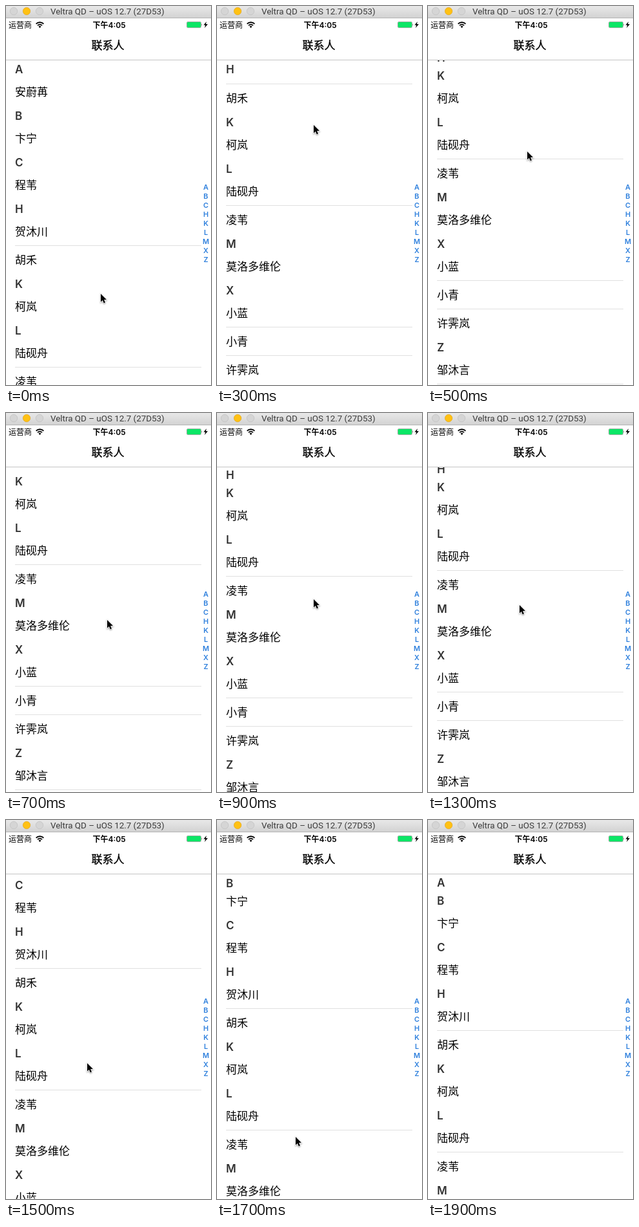
Recreate the animation shown at these times as an HTML page. Size 318 px wide and 586 px high, loop 2000 ms.

```html
<!DOCTYPE html>
<html lang="zh-CN">
<head>
<meta charset="utf-8">
<title>联系人</title>
<style>
  html, body { margin: 0; width: 100%; height: 100%; overflow: hidden; background: #fff; }
  svg { display: block; font-family: Inter, "Noto Sans CJK SC", "Noto Sans CJK", sans-serif; }
  .window { font: 13.4px Roboto, sans-serif; fill: #3c3c3c; }
  .status { font-size: 12px; }
  .title { font-size: 17px; font-weight: 500; text-anchor: middle; }
  .name { font: 17px "Noto Sans CJK SC", "Noto Sans CJK", sans-serif; }
  .letter { font-size: 17px; font-weight: 600; fill: #333; }
  .index { font-size: 11px; font-weight: 600; fill: #2f80dd; text-anchor: middle; }
  #cursor { filter: drop-shadow(0 1px 1px #0006); }
</style>
</head>
<body>
<svg width="318" height="586" viewBox="0 0 318 586">
  <defs>
    <linearGradient id="chrome" x2="0" y2="1">
      <stop stop-color="#e8e8e8"/><stop offset="1" stop-color="#d3d3d3"/>
    </linearGradient>
    <clipPath id="viewport"><rect y="84" width="318" height="502"/></clipPath>
  </defs>
  <rect width="318" height="586" fill="#fff"/>

  <g clip-path="url(#viewport)">
    <g id="rows"></g>
    <g id="headers"></g>
  </g>
  <g id="index"></g>

  <rect y="83" width="318" height="1" fill="#c4c4c4"/>
  <text class="title" x="158" y="67" stroke="#000" stroke-width=".35">联系人</text>

  <text class="status" x="4" y="34">运营商</text>
  <g fill="none" stroke="#000" stroke-width="1.8">
    <path d="M46.6 27.7a8.3 8.3 0 0 1 11.8 0M49 30.2a5 5 0 0 1 7 0"/>
    <path d="M52.5 34l-2-2.2a2.9 2.9 0 0 1 4 0z" fill="#000" stroke="none"/>
  </g>
  <text class="status" x="160" y="34" text-anchor="middle" font-weight="600">下午4:05</text>
  <rect x="280.5" y="24.5" width="22" height="9" rx="1.5" fill="#fff" stroke="#6a8f78" stroke-width=".7"/>
  <rect x="281" y="25" width="21" height="8" rx="1" fill="#0ce666"/>
  <path d="M303.5 27.3q1.6 1.7 0 3.4z" fill="#444"/>
  <path d="M311 24l-4.5 5.6h2.8l-1.3 4.4 5-6h-3z"/>

  <rect width="318" height="18" fill="url(#chrome)"/>
  <rect y="18" width="318" height="1" fill="#b4b4b4"/>
  <g stroke-width=".7">
    <circle cx="12" cy="8" r="5.7" fill="#d5d5d5" stroke="#bfbfbf"/>
    <circle cx="32" cy="8" r="5.7" fill="#ffc114" stroke="#e3a51f"/>
    <circle cx="52" cy="8" r="5.7" fill="#d5d5d5" stroke="#bfbfbf"/>
  </g>
  <text class="window" x="69" y="13">Veltra QD – uOS 12.7 (27D53)</text>

  <path id="cursor" d="M0 0V12.6L2.9 9.9 4.8 14.4 6.9 13.5 5.1 9.1H9Z"
        stroke="#fff" stroke-width="1.4" paint-order="stroke"/>
</svg>
<script>
const LOOP = 2000, STEP = 100;
const TOP = 83, HEADER = 28, ROW = 44;

const contacts = {
  A: ["安蔚苒"], B: ["卞宁"], C: ["程苇"], H: ["贺沐川", "胡禾"], K: ["柯岚"],
  L: ["陆砚舟", "凌苇"], M: ["莫洛多维伦"], X: ["小蓝", "小青", "许霁岚"], Z: ["邹沐言"]
};

// time, scroll offset, cursor x, cursor y
const keys = [
  [0, 0, 147, 445], [100, 70, 148, 372], [300, 250, 150, 184],
  [400, 300, 152, 190], [500, 322, 154, 225], [700, 324, 157, 320],
  [900, 306, 150, 288], [1100, 277, 143, 257], [1300, 315, 142, 297],
  [1400, 230, 135, 335], [1500, 141, 126, 376], [1600, 105, 124, 430],
  [1700, 79, 122, 490], [1800, 59, 120, 550], [1900, 45, 118, 610]
];

const byId = id => document.getElementById(id);

function add(parent, tag, attributes, text = "") {
  const node = document.createElementNS("http://www.w3.org/2000/svg", tag);
  for (const key in attributes) node.setAttribute(key, attributes[key]);
  node.textContent = text;
  parent.append(node);
  return node;
}

const move = (node, x, y) => node.setAttribute("transform", `translate(${x} ${y})`);

let y = 0;
const sections = Object.entries(contacts).map(([letter, names], i) => {
  const top = y;
  y += HEADER;
  names.forEach((name, n) => {
    add(byId("rows"), "text", { class: "name", x: 14, y: y + 28 }, name);
    y += ROW;
    if (n < names.length - 1 || letter === "Z")
      add(byId("rows"), "rect", { x: 14, y: y - 1, width: 289, height: 1, fill: "#e0e0e0" });
  });
  const header = add(byId("headers"), "g", {});
  add(header, "rect", { width: 304, height: HEADER, fill: "#fff" });
  add(header, "text", { class: "letter", x: 14, y: 21 }, letter);
  add(byId("index"), "text", { class: "index", x: 310, y: 284 + 14 * i }, letter);
  return { header, top, bottom: y };
});

function sample(time) {
  const next = keys.findIndex(key => key[0] > time);
  if (next < 0) return keys[keys.length - 1];
  const a = keys[next - 1], b = keys[next];
  const f = (time - a[0]) / (b[0] - a[0]);
  return a.map((value, i) => Math.round(value + (b[i] - value) * f));
}

function draw(now) {
  const time = Math.floor(now % LOOP / STEP) * STEP;
  const [, scroll, cursorX, cursorY] = sample(time);
  move(byId("rows"), 0, TOP - scroll);
  // Headers stick to the top until the next section pushes them away.
  for (const { header, top, bottom } of sections)
    move(header, 0, TOP + Math.max(top - scroll, Math.min(0, bottom - HEADER - scroll)));
  move(byId("cursor"), cursorX, cursorY);
}

const start = performance.now();
function tick() {
  draw(performance.now() - start);
  requestAnimationFrame(tick);
}
tick();
</script>
</body>
</html>
```
